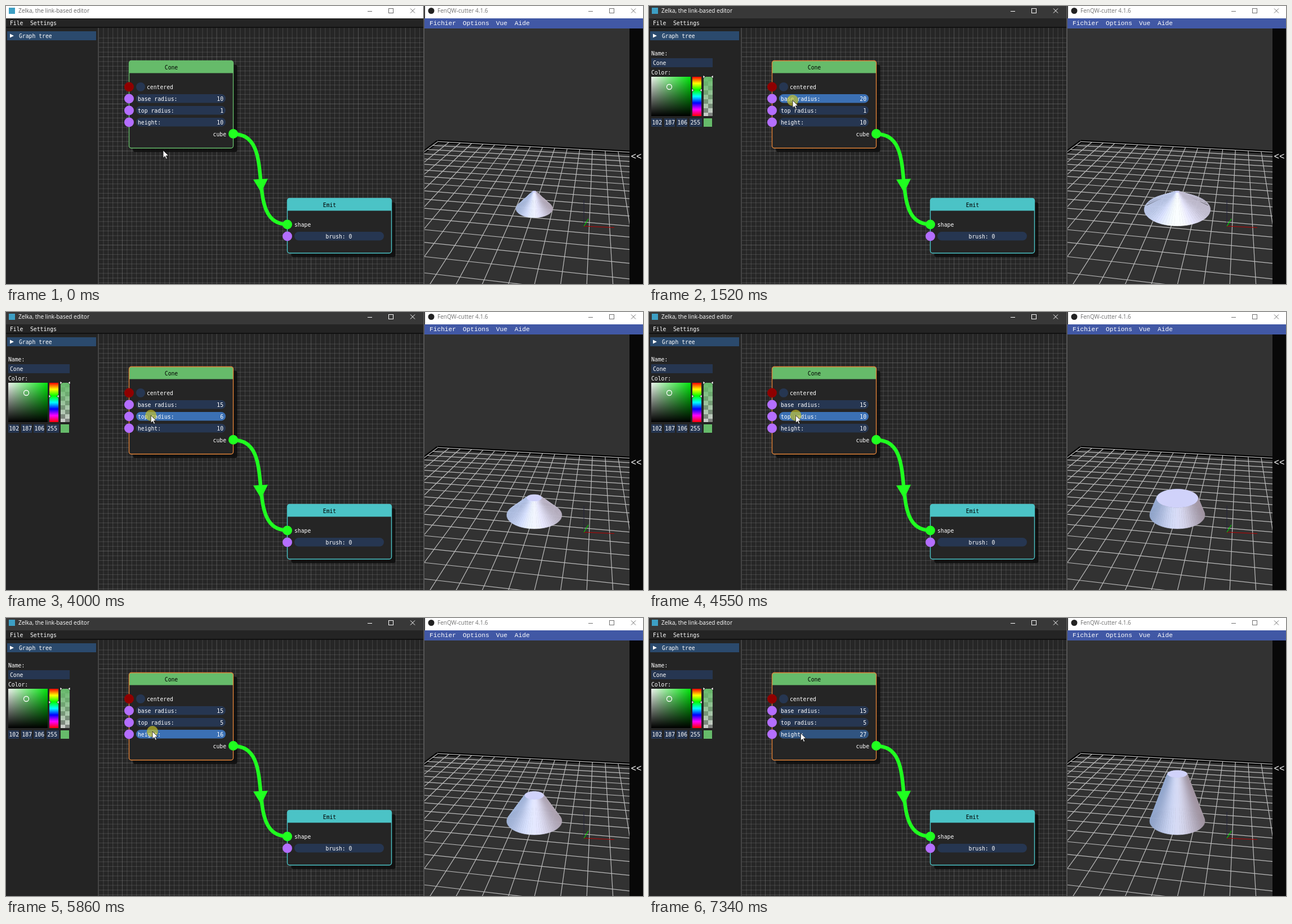
Write an HTML page with a canvas that moves like this. It is 1131x495 px and loops after 8.2 s.

```html
<!DOCTYPE html>
<html lang="en">
<head>
<meta charset="utf-8">
<style>
html, body { margin: 0; width: 100%; height: 100%; overflow: hidden; background: #242424; }
canvas { display: block; }
</style>
</head>
<body>
<canvas id="stage" width="1131" height="495"></canvas>
<script>
const g = document.getElementById('stage').getContext('2d');
const LOOP = 8200;
const MONO = '9.75px "DejaVu Sans Mono", monospace';
const MENU = '11.2px "Liberation Mono", monospace';
const TITLE = '10px "Open Sans", sans-serif';
const FIELD = '#263651', GREEN = '#66bb6a', TEAL = '#4bc3c6', LINK = '#20ff20', PURPLE = '#b46eff';
const PX_PER_UNIT = 0.838;

// Cursor moves: start, end, number of steps, target x, target y
const moves = [
  [70, 300, 4, 247.5, 170], [450, 610, 3, 246.5, 168],
  [1210, 1520, 5, 255, 168], [1590, 1750, 3, 277, 168], [2300, 2540, 4, 251, 167],
  [3150, 3370, 4, 253, 182], [3840, 4000, 3, 257.2, 184], [4070, 4380, 5, 261.5, 184],
  [4550, 4880, 5, 256.4, 184], [5160, 5400, 4, 255, 202],
  [5810, 5810, 1, 259.2, 202], [5860, 5860, 1, 260, 202], [5950, 6490, 8, 269.3, 205]
];

// Sliders: label, row centre, initial value, press time, release time, x at press
const sliders = [
  ['base radius:', 165, 10, 980, 3000, 246.5],
  ['top radius:', 186, 1, 3690, 5090, 253],
  ['height:', 207, 10, 5630, 7340, 255]
];

function cursorAt(t) {
  let x = 279, y = 257;
  for (const [start, end, n, tx, ty] of moves) {
    if (t < start) break;
    const u = Math.min(1, (Math.floor((t - start) / (end - start || 1) * (n - 1) + 1e-6) + 1) / n);
    x += (tx - x) * u;
    y += (ty - y) * u;
  }
  return [x, y];
}

const valuesAt = t => sliders.map(([, , value, press, release, x0]) =>
  t < press ? value : value + Math.round((cursorAt(Math.min(t, release))[0] - x0) / PX_PER_UNIT));

function rect(x, y, w, h, color) {
  g.fillStyle = color;
  g.fillRect(x, y, w, h);
}

function round(x, y, w, h, r, color) {
  g.beginPath();
  g.roundRect(x, y, w, h, r);
  g.fillStyle = color;
  g.fill();
}

function dot(x, y, r, color) {
  g.beginPath();
  g.arc(x, y, r, 0, 7);
  g.fillStyle = color;
  g.fill();
}

function path(points, color, width, fill) {
  g.beginPath();
  points.forEach(p => g.lineTo(...p));
  if (fill) {
    g.closePath();
    g.fillStyle = fill;
    g.fill();
  }
  if (width) {
    g.strokeStyle = color;
    g.lineWidth = width;
    g.stroke();
  }
}

function text(s, x, y, color = '#fff', font = MONO, align = 'left') {
  g.font = font;
  g.textAlign = align;
  g.fillStyle = color;
  g.fillText(s, x, y + 3.5);
}

function titleBar(x, w, title, bg, color, controls, logo) {
  rect(x, 0, w, 22, bg);
  logo();
  text(title, x + 22, 8.5, color, TITLE);
  const c = controls;
  path([[c, 9.5], [c + 8, 9.5]], color, 1);
  g.strokeRect(c + 37.5, 4.5, 8, 8);
  path([[c + 76, 4.5], [c + 84, 12.5]], color, 1);
  path([[c + 84, 4.5], [c + 76, 12.5]], color, 1);
}

function editorGrid() {
  rect(164, 39, 578, 456, '#262626');
  const line = (i, x, y, w, h) => rect(x, y, w, h, `rgba(200,200,200,${i % 10 ? 0.19 : 0.28})`);
  const step = 10 * PX_PER_UNIT;
  for (let i = -4; i < 64; i++) {
    const x = 206 + i * step, y = 90 + i * step;
    if (x > 164 && x < 741) line(i, x, 39, 1, 456);
    if (y > 39 && y < 495) line(i, 165, y, 576, 1);
  }
  rect(163, 39, 2, 456, '#454545');
}

function node(x, y, w, h, title, color, border) {
  round(x + 7, y + 7, w, h, 4, 'rgba(12,12,12,.85)');
  round(x, y, w, h, 4, '#252525');
  round(x, y, w, 22, [4, 4, 0, 0], color);
  g.beginPath();
  g.roundRect(x, y, w, h, 4);
  g.strokeStyle = border;
  g.lineWidth = 1.4;
  g.stroke();
  text(title, x + 75, y + 12, '#000', MONO, 'center');
}

function gradient(x0, y0, x1, y1, colors) {
  const grad = g.createLinearGradient(x0, y0, x1, y1);
  colors.forEach((c, i) => grad.addColorStop(i / (colors.length - 1), c));
  return grad;
}

function properties() {
  text('Name:', 4, 84);
  rect(4, 93, 109, 16, FIELD);
  text('Cone', 7, 101);
  text('Color:', 4, 118);
  rect(4, 126, 70, 70, gradient(4, 0, 74, 0, ['#f0f5f0', '#00e60c']));
  rect(4, 126, 70, 70, gradient(0, 126, 0, 196, ['rgba(0,0,0,0)', '#000']));
  g.beginPath();
  g.arc(36, 144, 4.5, 0, 7);
  g.strokeStyle = '#fff';
  g.lineWidth = 1.3;
  g.stroke();
  rect(77, 126, 16, 70, gradient(0, 126, 0, 196, ['#f00', '#ff0', '#0f0', '#0ff', '#00f', '#f0f', '#f00']));
  for (let r = 0; r < 9; r++)
    for (let c = 0; c < 2; c++)
      rect(97 + c * 8, 126 + r * 8, 8, Math.min(8, 70 - r * 8), (r + c) % 2 ? '#808080' : '#ccc');
  rect(97, 126, 16, 70, gradient(0, 126, 0, 196, [GREEN, 'rgba(102,187,106,0)']));
  for (const [x, y] of [[77, 150], [97, 126]]) {
    path([[x - 1, y - 3], [x + 3, y], [x - 1, y + 3]], '#000', 0.7, '#fff');
    path([[x + 17, y - 3], [x + 13, y], [x + 17, y + 3]], '#000', 0.7, '#fff');
  }
  [102, 187, 106, 255].forEach((v, i) => {
    const x = [4, 27, 49, 72][i];
    rect(x, 200, i < 3 ? 19 : 22, 15, FIELD);
    text(v, x + 1.5, 207.5);
  });
  rect(97, 200, 15, 15, GREEN);
}

// Perspective view of the print bed: x right, d away from the viewer, z up
function project(x, d, z) {
  const w = 1 + (0.87 * d - 0.493 * z) / 180;
  return [938 + 3.25 * x / w, 360 - 3.25 * (0.493 * d + 0.87 * z) / w];
}

const YAW = 0.166, BED = 100;
function onBed(u, v) {
  const c = Math.cos(YAW), s = Math.sin(YAW);
  return project(u * c + v * s, v * c - u * s, 0);
}
const rowLine = (v, color, width) => path([onBed(-BED, v), onBed(BED, v)], color, width);
const columnLine = (u, color, width) => path([onBed(u, BED), onBed(u, -BED)], color, width);

function cone(base, top, height) {
  const N = 72, slope = Math.hypot(height, base - top) || 1;
  const nh = height / slope, nz = (base - top) / slope;
  const ring = (a, r, z) => project(r * Math.cos(a), r * Math.sin(a), z);
  const facet = i => {
    const a = Math.PI / 2 + i * 2 * Math.PI / N, b = a + 2 * Math.PI / N, m = (a + b) / 2;
    const nx = nh * Math.cos(m), facing = Math.max(0, -Math.sin(m));
    const v = 130 + 70 * nz + 60 * facing ** 4;
    const color = `rgb(${v + 8 * nx},${v + 4 - 10 * nx},${v + 30 - 24 * nx})`;
    path([ring(a, base, 0), ring(b, base, 0), ring(b, top, height), ring(a, top, height)], color, 0.6, color);
  };
  for (let i = 0; i < N / 2; i++) {
    facet(i);
    facet(-1 - i);
  }
  path(Array.from({ length: N }, (_, i) => ring(i * 2 * Math.PI / N, top, height)), '', 0, '#d0d2fa');
}

function slicer(t) {
  g.save();
  g.beginPath();
  g.rect(743, 39, 388, 456);
  g.clip();
  rect(743, 39, 388, 456, '#323232');
  rowLine(BED, '#000', 6);
  columnLine(-BED, '#000', 6);
  for (let k = -BED; k <= BED; k += 10) {
    rowLine(k, '#bdbdbd', 1.2);
    columnLine(k, '#bdbdbd', 1.2);
  }
  path([[1026, 392], [1026, 345]], '#22223a', 1);
  path([[1026, 392], [1080, 394.5]], '#b80000', 1.2);
  path([[1026, 392], [1034, 379]], '#00d800', 1.2);
  cone(...valuesAt(Math.max(0, t - 45)));
  g.restore();
  rect(1107, 39, 24, 456, '#080808');
  text('<<', 1119, 269, '#fff', '16px "Liberation Mono", monospace', 'center');
  titleBar(744, 387, 'FenQW-cutter 4.1.6', '#fff', '#707070', 1034, () => dot(755, 8.5, 5.5, '#222'));
  rect(743, 22, 388, 18, '#4158a5');
  ['Fichier', 'Options', 'Vue', 'Aide'].forEach((s, i) => text(s, [752, 811, 870, 903][i], 30.5, '#fff', MENU));
  rect(741, 0, 2, 495, '#555');
}

function link() {
  g.beginPath();
  g.moveTo(404, 228);
  g.bezierCurveTo(485, 228, 419, 389, 500, 389);
  g.strokeStyle = LINK;
  g.lineWidth = 6.5;
  g.stroke();
  path([[439, 309], [465, 307.5], [453, 332]], '', 0, LINK);
}

function pointer(x, y) {
  const shape = [[0, 0], [0, 13.5], [3.2, 10.6], [5.3, 15.4], [7.4, 14.5], [5.3, 9.8], [9.6, 9.6]];
  path(shape.concat([[0, 0]]).map(([a, b]) => [x + a, y + b]), '#111', 0.8, '#fff');
}

function editor(t) {
  const selected = t >= 980, [cx, cy] = cursorAt(t), values = valuesAt(t);
  editorGrid();
  rect(0, 39, 163, 456, '#242424');
  rect(2, 45, 158, 16, '#2b4a6d');
  path([[7, 49.5], [14, 53], [7, 56.5]], '', 0, '#fff');
  text('Graph tree', 23, 53.5);
  if (selected) properties();

  node(218.5, 97.5, 185, 155.5, 'Cone', GREEN, selected ? '#e08238' : GREEN);
  node(499.5, 342.5, 185, 97.5, 'Emit', TEAL, TEAL);
  link();

  dot(218.5, 144, 8.5, '#8f0000');
  dot(239, 144, 8, FIELD);
  text('centered', 250, 144.5);
  let pressed = false;
  sliders.forEach(([label, y, , press, release], i) => {
    const active = t >= press && t < release;
    const hover = Math.abs(cy - y) < 8;
    pressed = pressed || active;
    dot(218.5, y, 8.5, PURPLE);
    round(231, y - 8, 159, 15.5, 7.75, active ? '#3b70b4' : hover ? '#305480' : FIELD);
    text(label, 234, y + 0.5);
    text(values[i], 386, y + 0.5, '#fff', MONO, 'right');
  });
  text('cube', 391, 228, '#fff', MONO, 'right');
  dot(403.5, 227.5, 8.5, LINK);
  dot(499.5, 389, 8.5, LINK);
  text('shape', 512, 389.5);
  dot(499.5, 410, 8.5, PURPLE);
  round(512, 402, 159, 15.5, 7.75, FIELD);
  text('brush: 0', 591, 410.5, '#fff', MONO, 'center');

  titleBar(0, 742, 'Zelka, the link-based editor', selected ? '#383838' : '#fff', selected ? '#fff' : '#666',
    642, () => rect(5, 3, 11, 11, '#3d9fc4'));
  rect(0, 22, 742, 17, '#242424');
  rect(0, 37, 742, 2, '#111');
  text('File', 7, 30.5);
  text('Settings', 43, 30.5);

  if (pressed) dot(cx, cy, 10, 'rgba(205,200,40,.65)');
  pointer(cx, cy);
}

function frame(now) {
  const t = now % LOOP;
  editor(t);
  slicer(t);
  requestAnimationFrame(frame);
}
requestAnimationFrame(frame);
</script>
</body>
</html>
```
